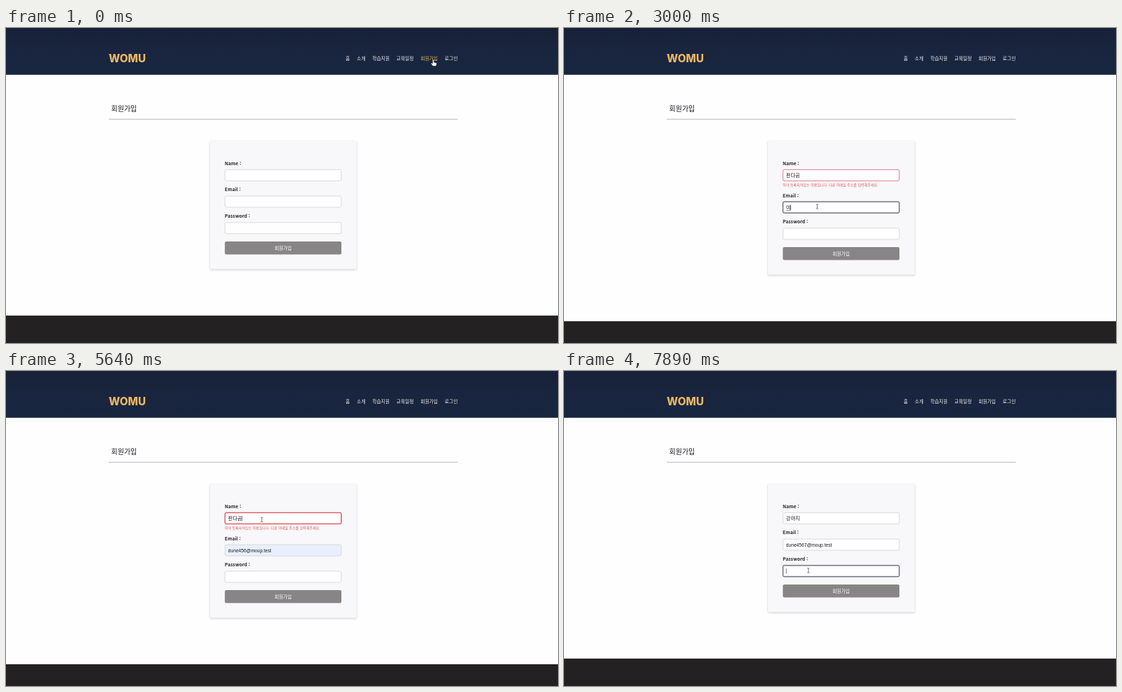
Recreate the animation shown at these times as an HTML page. Size 790 by 450 pixels, loop 8 s.

```html
<!DOCTYPE html>
<html lang="ko">
<head>
<meta charset="utf-8">
<style>
  html, body { margin: 0; width: 100%; height: 100%; overflow: hidden; background: #fefdff; }
  svg { display: block; width: 790px; height: 450px; }
  text { font-family: "Noto Sans CJK KR", "Noto Sans CJK JP", "Noto Sans CJK", "Noto Sans", sans-serif; font-size: 6.75px; white-space: pre; }
  .logo { font: 800 15.3px Inter, sans-serif; fill: #eab562; }
  .label { font-weight: 700; fill: #29272a; }
  .value { font-family: "Liberation Sans", "Noto Sans CJK KR", "Noto Sans CJK JP", sans-serif; }
  .error { font-size: 5.06px; fill: #dc5a62; }
  .card { filter: drop-shadow(0 1px 1.5px rgba(0, 0, 0, .2)); }
</style>
</head>
<body>
<svg id="stage" viewBox="0 0 790 450">
  <defs>
    <linearGradient id="night" x2="0" y2="1">
      <stop stop-color="#172137"/><stop offset=".4" stop-color="#19253e"/><stop offset="1" stop-color="#19263f"/>
    </linearGradient>
  </defs>
  <rect width="790" height="450" fill="#fefdff"/>
  <rect width="790" height="66.8" fill="url(#night)"/>
  <text class="logo" x="147" y="49">WOMU</text>
  <g id="nav" fill="#f2f2f4"></g>
  <text x="150.5" y="118.7" style="font-size:10px" fill="#1c1a1d">회원가입</text>
  <path d="M147 130.3H646.6" stroke="#b4b3b5" stroke-width=".9"/>
  <rect id="card" class="card" x="292" y="161.5" width="209.8" fill="#f8f7f9"/>
  <g id="fields"></g>
  <g id="button">
    <rect x="313.2" y="305" width="166.8" height="18.4" rx="2" fill="#888587"/>
    <text x="396.6" y="317.1" text-anchor="middle" font-weight="500" fill="#fff">회원가입</text>
  </g>
  <rect id="footer" y="411" width="790" height="40" fill="#232122"/>
  <g id="cursor">
    <path id="hand" d="M-.9 .6Q0-.7 .9 .6V4L4 4.8Q5 5.2 4.8 6.4L4 9.3H-.6L-3.2 5.8Q-3.2 4.6-2 5L-.9 6Z" fill="#fff" stroke="#222" stroke-width=".45"/>
    <path id="arrow" d="M0 0V7.2L1.7 5.7 2.9 8.2 4 7.7 2.9 5.2H5.1Z" fill="#fff" stroke="#333" stroke-width=".6"/>
    <path id="beam" d="M-1.6-3.3Q0-3.3 0-2.5Q0-3.3 1.6-3.3M0-2.5V2.5M-1.6 3.3Q0 3.3 0 2.5Q0 3.3 1.6 3.3" fill="none" stroke="#333" stroke-width=".65"/>
  </g>
</svg>
<script>
const LOOP = 8000, FADE = 150, SHIFT = 8.1, PITCH = 37.7;
const byId = id => document.getElementById(id);

function add(parent, tag, attrs = {}, content = '') {
  const node = document.createElementNS('http://www.w3.org/2000/svg', tag);
  for (const key in attrs) node.setAttribute(key, attrs[key]);
  node.textContent = content;
  return parent.appendChild(node);
}
const set = (node, attrs) => { for (const key in attrs) node.setAttribute(key, attrs[key]); };
const show = (node, visible) => node.setAttribute('visibility', visible ? 'visible' : 'hidden');
const clamp = v => Math.min(1, Math.max(0, v));
const inside = (t, spans) => spans.some(([from, to]) => t >= from && t < to);
const faded = (t, spans) => Math.max(0, ...spans.map(([from, to]) =>
  Math.min(clamp((t - from + 25) / FADE), 1 - clamp((t - to + 25) / FADE))));
const stepAt = (t, steps) => steps.reduce((now, [time, value]) => t >= time ? value : now, '');

const menu = [[486, '홈'], [502, '소개'], [524.2, '학습지원'], [558.7, '교육일정'], [593.2, '회원가입'], [627.8, '로그인']]
  .map(([x, label]) => add(byId('nav'), 'text', { x, y: 46 }, label));

const mail = 'dune456@moup.test', newMail = 'dune4567@moup.test';
const fields = [
  {
    label: 'Name :', message: '이미 등록되어있는 이름입니다. 다른 이메일 주소를 입력해주세요.',
    focus: [[850, 2050], [5500, 6750]],
    error: [[2150, 2300], [2700, 6850]],
    composing: [[1200, 2050], [6090, 6750]],
    noCaret: [[5750, 6090]],
    text: [[1200, 'ㅍ'], [1300, '파'], [1450, '판'], [1550, '판ㄷ'], [1600, '판다'], [1650, '판닥'], [1700, '판다고'], [1750, '판다곰'],
      [6090, 'ㄱ'], [6150, '가'], [6220, '강'], [6300, '강ㅇ'], [6350, '강아'], [6420, '강앚'], [6490, '강아지']]
  },
  {
    label: 'Email :', message: '이미 사용 중인 이메일입니다.',
    focus: [[2300, 5500], [6750, 7690]],
    error: [[5700, 7740]],
    composing: [[2950, 3770]],
    noCaret: [[3460, 3670], [3930, 4080], [4630, 4840], [5040, 5500]],
    text: [[2950, 'ㅇ'], [3000, '여'], [3070, '여ㅜ'], [3150, '여ㅜㄷ'], [3670, '여ㅜ'], [3720, '여'], [3770, ''],
      [4150, 'd'], [4230, 'du'], [4300, 'dun'], [4380, 'dune'], [4840, mail], [7200, newMail]]
  },
  { label: 'Password :', message: '', focus: [[7690, 9000]], error: [], composing: [], noCaret: [], text: [] }
];

fields.forEach(field => {
  const g = field.group = add(byId('fields'), 'g');
  const frame = { x: 313.4, y: 202.4, width: 166.4, height: 16, rx: 2 };
  add(g, 'text', { x: 313, y: 195.8, class: 'label' }, field.label);
  field.box = add(g, 'rect', { ...frame, stroke: '#d3d2d5', 'stroke-width': .8 });
  field.errorRing = add(g, 'rect', { ...frame, fill: 'none', stroke: '#e4828a', 'stroke-width': .9 });
  field.glow = add(g, 'rect', { ...frame, fill: 'none', 'stroke-width': 2 });
  field.ring = add(g, 'rect', { ...frame, fill: 'none', 'stroke-width': 1 });
  field.selection = add(g, 'rect', { x: 318, y: 206, width: 20, height: 9, fill: '#4868a5' });
  field.value = add(g, 'text', { x: 317.8, class: 'value' });
  field.underline = add(g, 'rect', { y: 214.2, height: .5, fill: '#333' });
  field.caret = add(g, 'rect', { y: 206.8, width: .6, height: 7.4, fill: '#222' });
  field.note = add(g, 'text', { x: 313, y: 225.9, class: 'error' }, field.message);
});

function drawField(field, t, y) {
  const text = stepAt(t, field.text), hangul = /[ㄱ-힣]/.test(text);
  const failed = inside(t, field.error), focus = faded(t, field.focus);
  const isMail = field === fields[1], selected = field === fields[0] && inside(t, [[5750, 6090]]);
  const ringColor = failed ? '#df555e' : '#59616e';
  set(field.group, { transform: `translate(0 ${y})` });
  set(field.box, { fill: isMail && inside(t, [[4840, 7200]]) ? '#e8f0fe' : '#fefdff' });
  set(field.errorRing, { opacity: faded(t, field.error) });
  set(field.ring, { opacity: focus, stroke: ringColor });
  set(field.glow, { opacity: focus * .22, stroke: ringColor });
  if (field.value.textContent !== text) field.value.textContent = text;
  field.value.style.fontSize = hangul ? '7.2px' : '6.667px';
  set(field.value, { y: hangul ? 213.3 : 212.9, fill: selected ? '#fff' : '#1b1a1c' });
  show(field.selection, selected);
  show(field.note, failed);

  const caretIndex = t > 6750 && isMail ? text.indexOf('@') : text.length;
  const measure = n => n > 0 ? field.value.getSubStringLength(0, n) : 0;
  const end = measure(caretIndex);
  const nudge = isMail && inside(t, [[4080, 4150]]) ? 1.8 : 0;
  set(field.caret, { x: 317.8 + end + nudge });
  show(field.caret, inside(t, field.focus) && !inside(t, field.noCaret));
  const start = measure(text.length - 1);
  set(field.underline, { x: 318 + start, width: Math.max(0, end - start - .4) });
  show(field.underline, text && inside(t, field.composing));
}

const path = [[50, 611.5, 45], [450, 390, 250], [700, 364.5, 226], [2050, 364.5, 226], [2250, 361.5, 255],
  [2700, 361.5, 255], [2800, 362.3, 255], [5240, 362.3, 255], [5500, 366, 212.4], [6490, 366, 212.4],
  [6720, 341.5, 256], [7250, 341.5, 256], [7600, 349.8, 285]];

function pointerAt(t) {
  const i = path.findIndex(([time]) => time > t);
  if (i <= 0) return path[i ? path.length - 1 : 0].slice(1);
  const [t0, x0, y0] = path[i - 1], [t1, x1, y1] = path[i];
  const k = (t - t0) / (t1 - t0), ease = k * k * (3 - 2 * k);
  return [x0 + (x1 - x0) * ease, y0 + (y1 - y0) * ease];
}

function render(t) {
  const nameShift = inside(t, fields[0].error) ? SHIFT : 0;
  const total = nameShift + (inside(t, fields[1].error) ? SHIFT : 0);
  const offsets = [0, PITCH + nameShift, PITCH * 2 + total];
  fields.forEach((field, i) => drawField(field, t, offsets[i]));
  set(byId('card'), { height: 183 + total });
  set(byId('button'), { transform: `translate(0 ${total})` });
  set(byId('footer'), { y: 410.8 + total });

  const [x, y] = pointerAt(t), onMenu = y < 52;
  const onField = x > 313 && x < 480 && offsets.some(d => y > 202 + d && y < 218.6 + d);
  set(menu[4], { fill: onMenu ? '#eab562' : '#f2f2f4', 'font-weight': onMenu ? 500 : 400 });
  set(byId('cursor'), { transform: `translate(${x} ${y})` });
  show(byId('hand'), onMenu);
  show(byId('beam'), onField);
  show(byId('arrow'), !onMenu && !onField);
}

const begin = performance.now();
function tick() {
  render((performance.now() - begin) % LOOP);
  requestAnimationFrame(tick);
}
tick();
</script>
</body>
</html>
```
